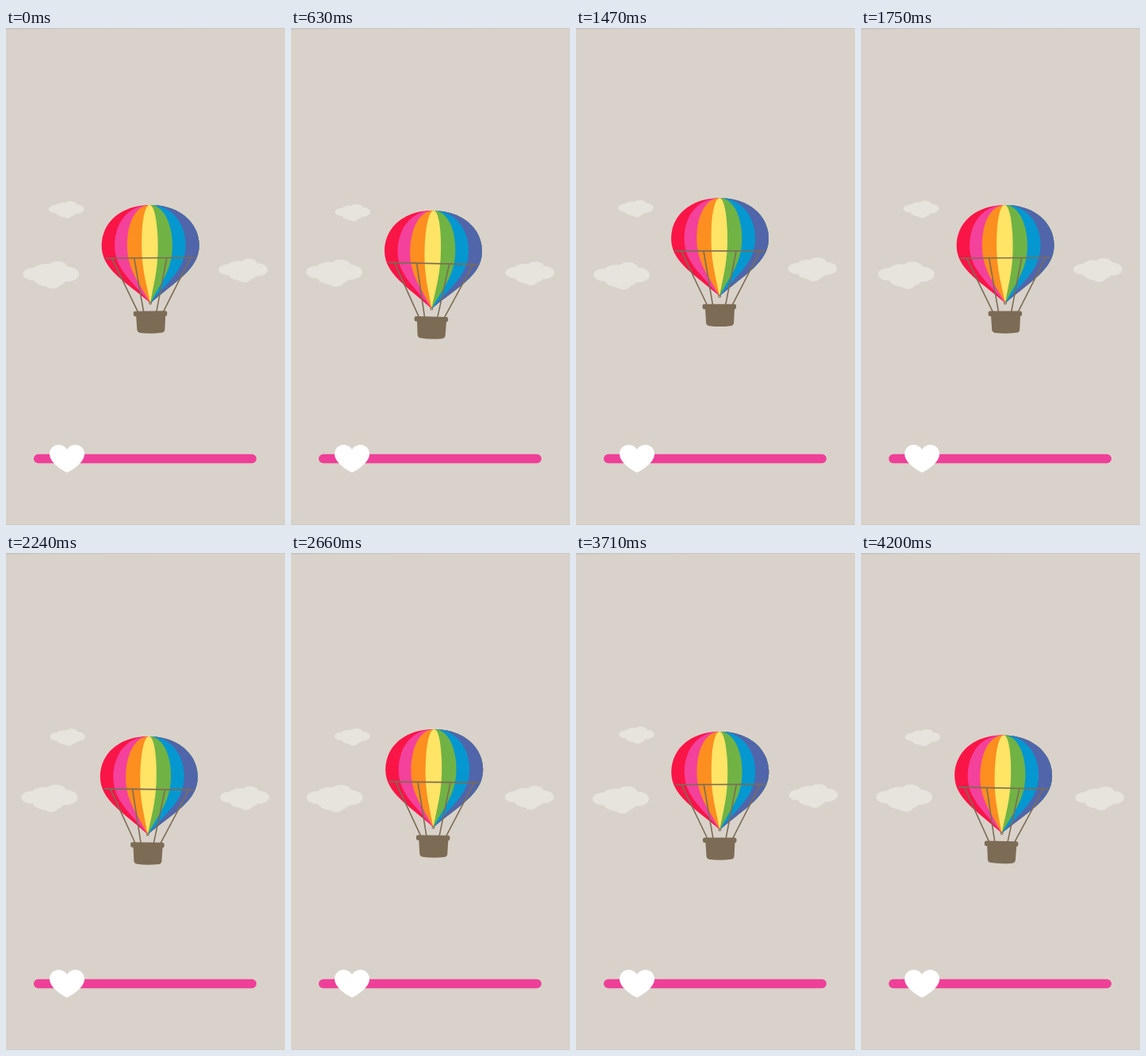
Write an HTML page that moves like this. It is 352 px wide and 626 px high and loops after 4270 ms.

```html
<!DOCTYPE html>
<html lang="en">
<head>
<meta charset="utf-8">
<title>Balloon</title>
<style>
  html, body { margin: 0; width: 100%; height: 100%; overflow: hidden; background: #d9d2ca; }
  svg { display: block; width: 100%; height: 100%; }
  .cloud { fill: #e7e3dd; }
  .rig { fill: none; stroke: #7c6c55; stroke-width: 1.6; }
  .basket { fill: #7c6b55; }
</style>
</head>
<body>
<svg viewBox="0 0 352 626" preserveAspectRatio="none">
  <defs>
    <g id="puff">
      <ellipse cx="-22" cy="-1" rx="13.5" ry="8"/>
      <ellipse cx="-7" cy="-5" rx="16" ry="9"/>
      <ellipse cx="8" cy="-8.5" rx="13" ry="8.5"/>
      <ellipse cx="20" cy="-1" rx="15.5" ry="9.5"/>
      <ellipse cx="-1" cy="6" rx="20" ry="9"/>
      <ellipse cx="2" cy="10" rx="10" ry="7.5"/>
    </g>
  </defs>
  <rect width="352" height="626" fill="#d9d2ca"/>
  <path d="M0 0H352V.8L60 1L0 2Z" fill="#c6c5c3"/>
  <rect y="625.3" width="352" height=".7" fill="#cbc6bf"/>
  <g id="clouds" class="cloud"></g>
  <g id="balloon">
    <g id="stripes"></g>
    <path class="rig" d="M125 280.6H238M133 281L165.500 349M161 281L172.500 349M202 281L188.500 349M232 281L197 349"/>
    <circle class="rig" cx="181" cy="337.500" r="1.500" style="stroke-width:1"/>
    <rect class="basket" x="159.500" y="347.500" width="42.500" height="6.500" rx="2.200"/>
    <path class="basket" d="M162.800 352H200L199 371Q198.800 374.300 195 374.900Q181 376.600 168 374.900Q164.200 374.300 164 371Z"/>
  </g>
  <rect x="35" y="536.800" width="281" height="11.400" rx="5.700" fill="#ee4098"/>
  <path fill="#fff" d="M77 560C70 557 55 547 55 536.500C55 530 60 525 66 525C71 525 75 527.500 77 531C79 527.500 83 525 88 525C94 525 99 530 99 536.500C99 547 84 557 77 560Z"/>
</svg>
<script>
  const NS = 'http://www.w3.org/2000/svg';
  const LOOP = 4270, STEP = 70;
  const byId = id => document.getElementById(id);

  function add(parent, tag, attrs) {
    const el = document.createElementNS(NS, tag);
    for (const k in attrs) el.setAttribute(k, attrs[k]);
    return parent.appendChild(el);
  }

  // Each stripe covers everything from its left seam to the right rim.
  const MID = 181;
  const seam = x => {
    const at = k => MID + (x - MID) * k;
    return `C${at(.6)} 214 ${x} 236 ${x} 265C${x} 295 ${at(.51)} 310 ${MID} 337.5`;
  };
  const seamUp = x => {
    const at = k => MID + (x - MID) * k;
    return `C${at(.51)} 310 ${x} 295 ${x} 265C${x} 236 ${at(.6)} 214 ${MID} 214`;
  };
  const STRIPES = [
    [120, '#fa1547'], [136.5, '#f4419b'], [152.2, '#fd8e20'], [170.5, '#ffe466'],
    [191, '#70b344'], [209.3, '#0497d0'], [226, '#5165aa']
  ];
  for (const [x, fill] of STRIPES) {
    add(byId('stripes'), 'path', { d: `M${MID} 214${seam(x)}${seamUp(243)}Z`, fill });
  }

  // centre x, centre y, scale x, scale y, drift x, drift y
  const CLOUDS = [
    [76.7, 229.8, .63, .63, 1, 2.4],
    [56.1, 310.2, 1, 1, -1.4, -1.6],
    [299.8, 306.4, .87, .87, 1.4, 2.4]
  ].map(c => ({ c, el: add(byId('clouds'), 'use', { href: '#puff' }) }));

  // time, top of balloon, tilt in degrees
  const KEYS = [
    [0, 223, -.4], [220, 227.5, -.1], [450, 231, .8], [630, 230, 1.25],
    [840, 222.5, .6], [1120, 214, 0], [1300, 211.7, -.05], [1500, 215, -.05],
    [1680, 221.5, -.3], [1750, 223, -.35], [2000, 228, 0], [2240, 231, .75],
    [2440, 229.5, 1.15], [2660, 222, .5], [2940, 214.5, 0], [3130, 211.7, -.05],
    [3290, 214, 0], [3560, 222, -.35], [3920, 228, .3], [4200, 229.5, 1.2], [4270, 229.3, 1.25]
  ];

  const slope = (i, c) => {
    const a = KEYS[Math.max(i - 1, 0)], b = KEYS[Math.min(i + 1, KEYS.length - 1)];
    return (b[c] - a[c]) / (b[0] - a[0]);
  };

  // Cubic Hermite curve through the keys
  function sample(t, c) {
    let i = 0;
    while (i < KEYS.length - 2 && KEYS[i + 1][0] <= t) i++;
    const a = KEYS[i], b = KEYS[i + 1], h = b[0] - a[0], u = (t - a[0]) / h, v = 1 - u;
    return v * v * (1 + 2 * u) * a[c] + u * u * (3 - 2 * u) * b[c]
      + h * u * v * (v * slope(i, c) - u * slope(i + 1, c));
  }

  function draw(t) {
    const tilt = sample(t, 2);
    byId('balloon').setAttribute('transform',
      `translate(${-.7 * tilt} ${sample(t, 1) - 214}) rotate(${tilt} ${MID} 214)`);

    const drift = 1.08 * Math.cos(t * 2 * Math.PI / 1830 - 2);
    for (const { c: [x, y, sx, sy, dx, dy], el } of CLOUDS) {
      el.setAttribute('transform', `translate(${x + dx * drift} ${y + dy * drift}) scale(${sx} ${sy})`);
    }
  }

  const start = performance.now();
  function tick() {
    const t = (performance.now() - start) % LOOP;
    draw(Math.floor(t / STEP) * STEP);
    requestAnimationFrame(tick);
  }
  tick();
</script>
</body>
</html>
```
